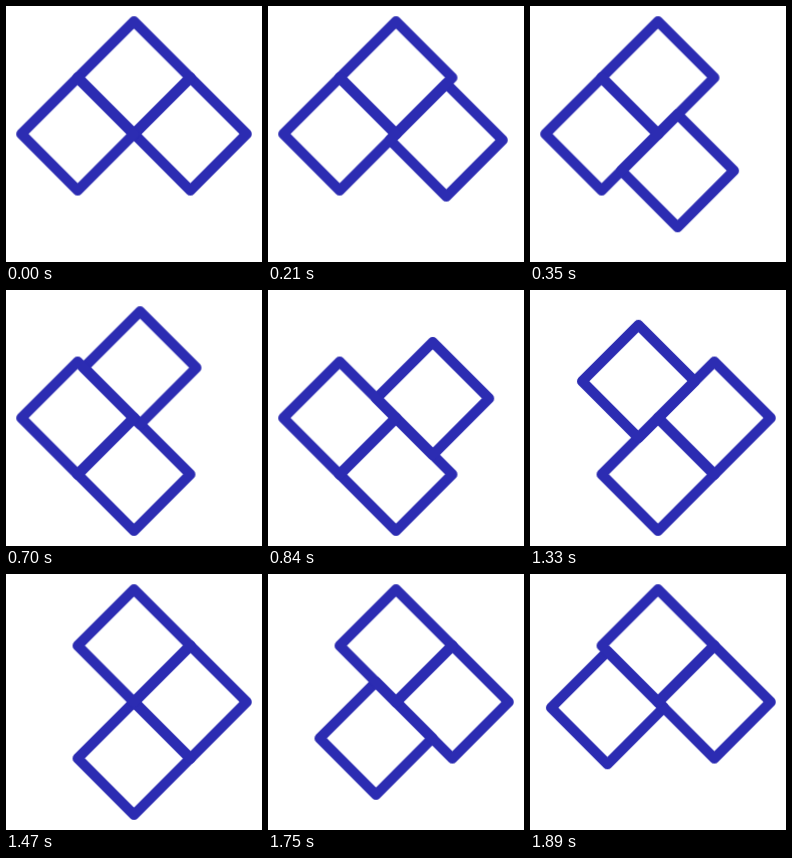
Write an HTML page that moves like this. It is 256 px wide and 256 px high and loops after 1.96 s.

```html
<!DOCTYPE html>
<html lang="en">
<head>
<meta charset="utf-8">
<title>Sliding squares</title>
<style>
  html, body {
    margin: 0;
    width: 100%;
    height: 100%;
    overflow: hidden;
    background: #fff;
  }
  svg {
    display: block;
    width: 100vw;
    height: 100vh;
  }
  path {
    fill: none;
    stroke: #2c2cb2;
    stroke-width: 4;
    stroke-linejoin: round;
    /* this curve eases as 3t² - 2t³ */
    animation: 1960ms cubic-bezier(.333333, 0, .666667, 1) infinite;
  }
  .a { animation-name: right-bottom-left; }
  .b { animation-name: top-right; }
  .c { animation-name: left-top; }

  /* each quarter of the loop: rest 140 ms, slide 350 ms */
  @keyframes right-bottom-left {
    0%, 7.142857% { transform: translate(72px, 50px); }
    25%, 82.142857% { transform: translate(50px, 72px); }
    100% { transform: translate(28px, 50px); }
  }
  @keyframes top-right {
    0%, 32.142857% { transform: translate(50px, 28px); }
    50%, 100% { transform: translate(72px, 50px); }
  }
  @keyframes left-top {
    0%, 57.142857% { transform: translate(28px, 50px); }
    75%, 100% { transform: translate(50px, 28px); }
  }
</style>
</head>
<body>
<svg viewBox="0 0 100 100">
  <path class="a" d="M0-22 22 0 0 22-22 0Z"/>
  <path class="b" d="M0-22 22 0 0 22-22 0Z"/>
  <path class="c" d="M0-22 22 0 0 22-22 0Z"/>
</svg>
</body>
</html>
```
